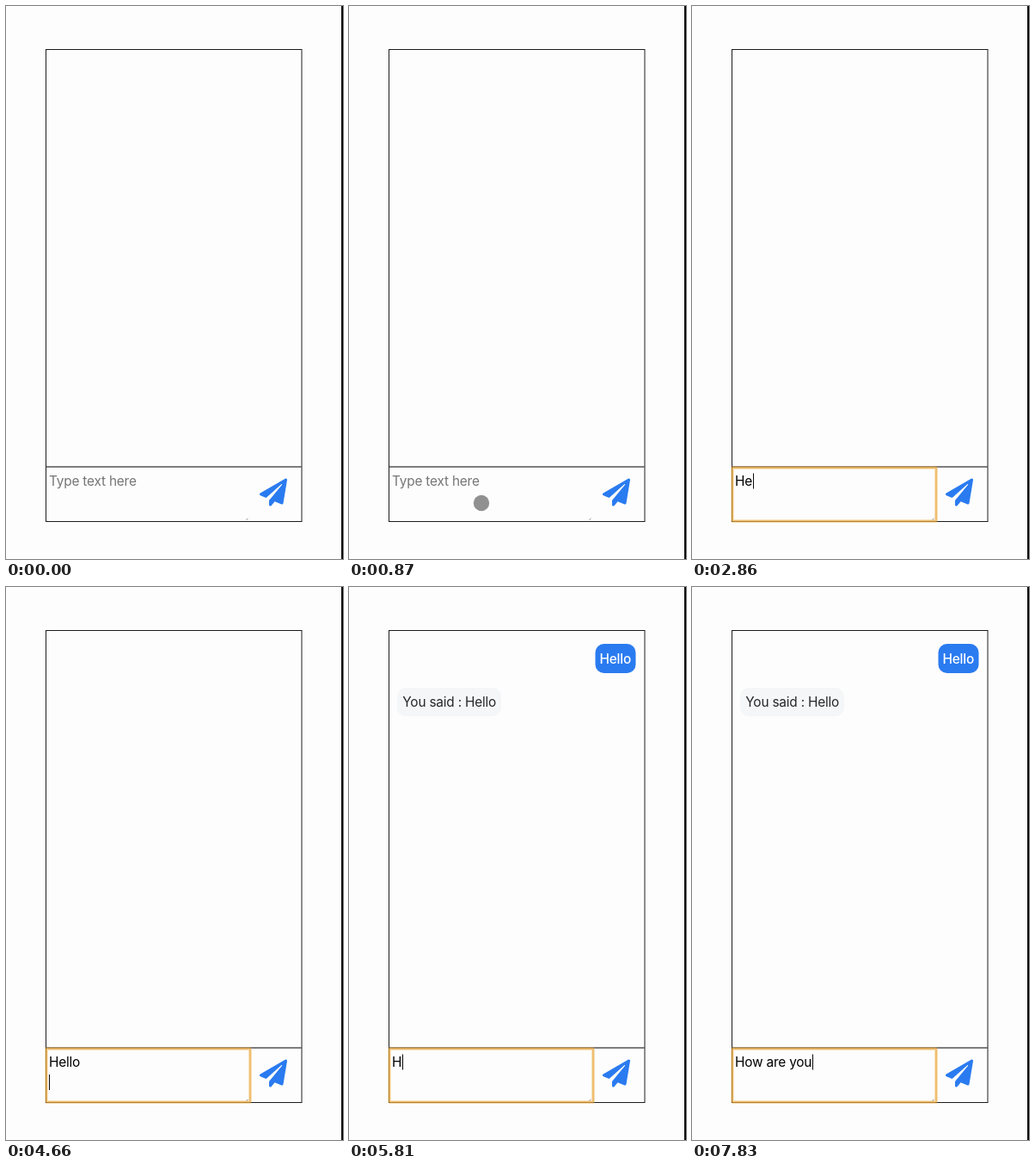
Write an HTML page that moves like this. It is 392x642 px and loops after 8 s.

```html
<!DOCTYPE html>
<html lang="en">
<head>
<meta charset="utf-8">
<title>Chat box</title>
<style>
  html, body { margin: 0; width: 100%; height: 100%; overflow: hidden; background: #fdfdfd; }
  svg { display: block; width: 392px; height: 642px; }
  text { font: 15.4px Inter, "Open Sans", sans-serif; letter-spacing: -.2px; white-space: pre; }
  #sent { font-weight: 500; }
</style>
</head>
<body>
<svg viewBox="0 0 392 642">
  <rect width="392" height="642" fill="#fdfdfd"/>
  <rect x="390" width="2" height="642" fill="#080808"/>
  <rect x="46.5" y="50.5" width="297.5" height="548" fill="none" stroke="#1c1c1c"/>
  <path d="M47 535H344" stroke="#555" stroke-width="1.4"/>
  <path d="M279.5 596.5l2-1.5" stroke="#888"/>
  <g id="ring" fill="none" stroke="#eba93f">
    <rect x="47" y="536" width="237" height="62" rx="1" stroke-width="4" opacity=".35"/>
    <rect x="47" y="536" width="237" height="62" rx="1" stroke-width="2" opacity=".6"/>
  </g>
  <path transform="translate(295 548.5) scale(.0625)" fill="#2a7bf0"
    d="M476 3L12 271c-18 10-15 35 3 43l106 44 287-253c6-5 14 3 9 9L176 407v80c0 24 28 33 42 16l64-77 125 52c14 6 30-3 33-18l72-432C515 8 493-7 476 3z"/>
  <g id="chat">
    <rect x="286.5" y="66" width="47" height="34" rx="10" fill="#2a7bf0"/>
    <text id="sent" x="291.5" y="89" fill="#fff">Hello</text>
    <rect x="56" y="117" width="121" height="33" rx="10" fill="#f4f6f7"/>
    <text x="62.3" y="139" fill="#25282b">You said : Hello</text>
  </g>
  <text id="hint" x="50" y="557" fill="#757575">Type text here</text>
  <text id="input" x="50" y="557" fill="#000"></text>
  <path id="caret" stroke="#0a0a0a"/>
  <circle id="dot" r="9.2" fill="#909090"/>
</svg>
<script>
const LOOP = 8000, FOCUS = 1750, FIRST_KEY = 2340, SENT = 4750, BLINK = 500;
const $ = id => document.getElementById(id);
const [ring, chat, hint, input, caret, dot] =
  ["ring", "chat", "hint", "input", "caret", "dot"].map($);

// Each entry: time of the key press, text afterwards
const keys = [
  [FOCUS, ""], [FIRST_KEY, "H"], [2810, "He"], [3860, "Hel"], [4000, "Hell"],
  [4210, "Hello"], [4660, "Hello\n"], [SENT, ""], [5810, "H"], [6050, "Ho"],
  [6130, "How"], [6310, "How "], [6400, "How a"], [6600, "How ar"],
  [6680, "How are"], [6810, "How are "], [7110, "How are y"],
  [7230, "How are yo"], [7830, "How are you"]
];

// Pointer moves: start, end, from, to; each in five jumps
const moves = [
  [60, 330, [192, 400], [168, 531]],
  [510, 870, [168, 531], [154, 577]]
];

const show = (el, on) => el.setAttribute("visibility", on ? "visible" : "hidden");

function pointer(t) {
  const [start, end, from, to] = moves.filter(m => t >= m[0]).pop() || moves[0];
  const step = Math.floor((t - start) / (end - start) * 4 + 1e-6);
  const p = Math.max(0, Math.min(1, (step + 1) / 5));
  return from.map((v, i) => v + (to[i] - v) * p);
}

function draw(t) {
  const focused = t >= FOCUS;
  show(ring, focused);
  show(chat, t >= SENT);
  show(hint, t < FIRST_KEY);

  const [pressed, text] = keys.filter(k => t >= k[0]).pop() || [0, ""];
  const [line, next] = text.split("\n");
  if (input.textContent !== line) input.textContent = line;

  const lit = Math.floor((t - pressed) / BLINK) % 2 === 0;
  show(caret, focused && lit);
  const width = next === undefined && line ? input.getComputedTextLength() : 0;
  const top = next === undefined ? 542.5 : 566;
  caret.setAttribute("d", `M${Math.ceil(50 + width) + .5} ${top}v18`);

  show(dot, t >= moves[0][0] && t < FIRST_KEY);
  const [x, y] = pointer(t);
  dot.setAttribute("cx", x);
  dot.setAttribute("cy", y);
}

const begin = performance.now();
function tick() {
  draw((performance.now() - begin) % LOOP);
  requestAnimationFrame(tick);
}
tick();
</script>
</body>
</html>
```
